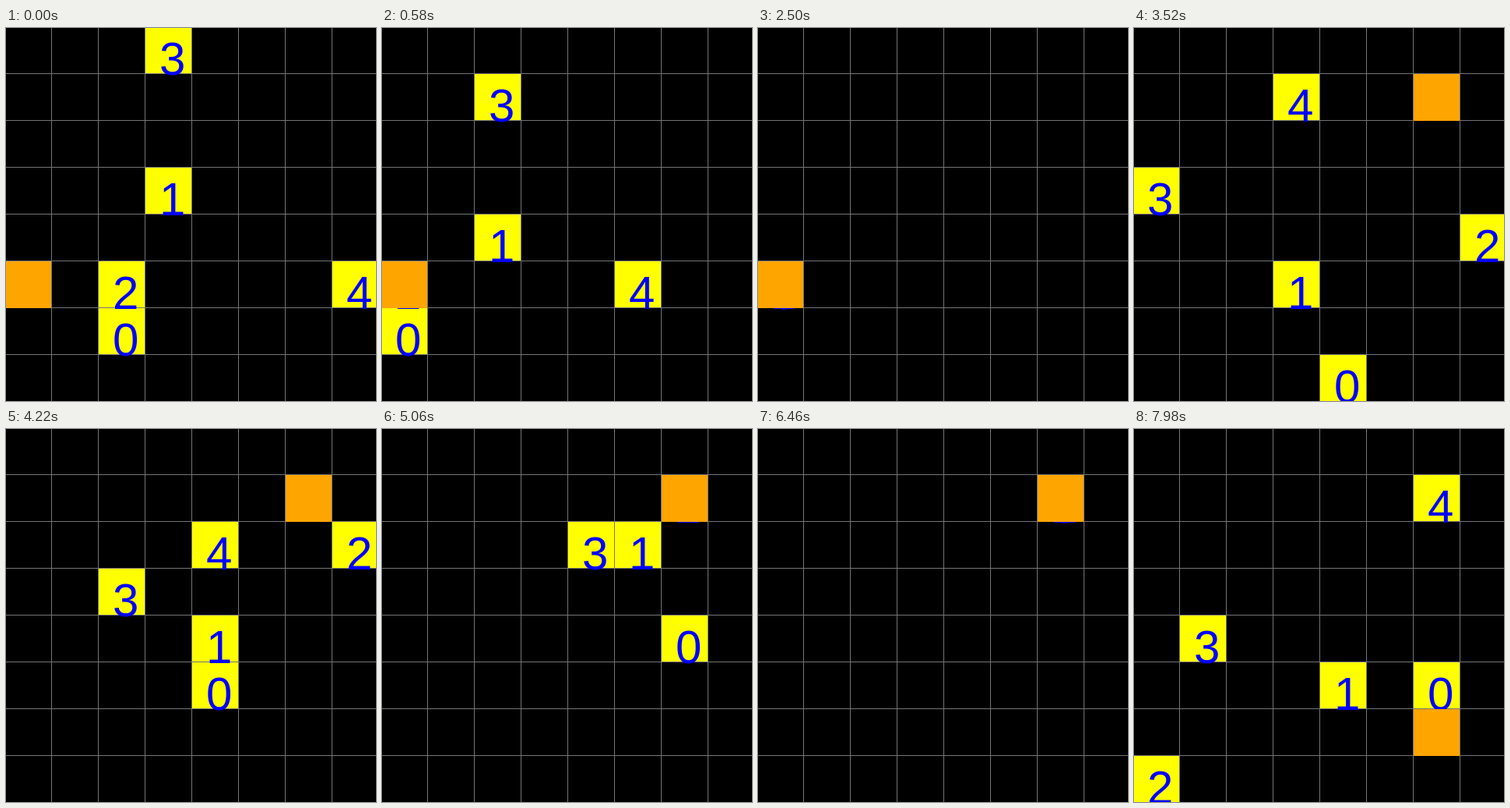
These frames come from a looping animation (475x478 px, 8 s). An HTML page with a canvas:

```html
<!DOCTYPE html>
<html>
<head>
<meta charset="utf-8">
<style>
  html, body { margin: 0; width: 100%; height: 100%; overflow: hidden; background: #000; }
  canvas { display: block; }
</style>
</head>
<body>
<canvas id="stage" width="475" height="478"></canvas>
<script>
const ctx = document.getElementById('stage').getContext('2d');
const LOOP = 8000, CELL = 60, MOVE_TIME = 280;
const DIRECTIONS = { L: [-1, 0], R: [1, 0], U: [0, -1], D: [0, 1] };

// Each agent: start column, start row, moves.
const scenes = [
  { start: 0, firstMove: 120, goal: [0, 5], agents: [
    [2, 6, 'LLU'], [3, 3, 'LDLDL'], [2, 5, 'LL'], [3, 0, 'DLDLDDDL'], [7, 5, 'LLLLLLL']] },
  { start: 3520, firstMove: 3900, goal: [6, 1], agents: [
    [4, 7, 'UURURRUUUL'], [3, 5, 'RUUURRU'], [7, 4, 'UUUL'], [0, 3, 'RRRURRRU'], [3, 1, 'DRRRU']] },
  { start: 7860, firstMove: LOOP, goal: [6, 6], agents: [
    [6, 5, ''], [4, 5, ''], [0, 7, ''], [1, 4, ''], [6, 1, '']] }
];

function positionAfter([col, row, moves], count) {
  for (const move of moves.slice(0, count)) {
    col += DIRECTIONS[move][0];
    row += DIRECTIONS[move][1];
  }
  return [col, row];
}

function fillCell(col, row, color, height = CELL - 1) {
  ctx.fillStyle = color;
  ctx.fillRect(col * CELL - 1, row * CELL - 1, CELL - 1, height);
}

function drawGrid() {
  ctx.fillStyle = '#000';
  ctx.fillRect(0, 0, 475, 478);
  ctx.fillStyle = '#747474';
  for (let p = CELL - 2; p < 475; p += CELL) {
    ctx.fillRect(p, 0, 1, 478);
    ctx.fillRect(0, p, 475, 1);
  }
}

function draw(time) {
  const scene = scenes.findLast(s => time >= s.start);
  const count = Math.max(0, Math.floor((time - scene.firstMove) / MOVE_TIME) + 1);
  drawGrid();
  ctx.font = '60px "Liberation Sans", Arial, sans-serif';
  scene.agents.forEach((agent, label) => {
    const [col, row] = positionAfter(agent, count);
    fillCell(col, row, '#ff0');
    ctx.fillStyle = '#00f';
    ctx.fillText(label, col * CELL + 17, row * CELL + 59.5);
  });
  // The goal hides the agents that have reached it.
  fillCell(...scene.goal, '#ffa500', CELL);
}

const origin = performance.now();
function tick() {
  draw((performance.now() - origin) % LOOP);
  requestAnimationFrame(tick);
}
tick();
</script>
</body>
</html>
```
